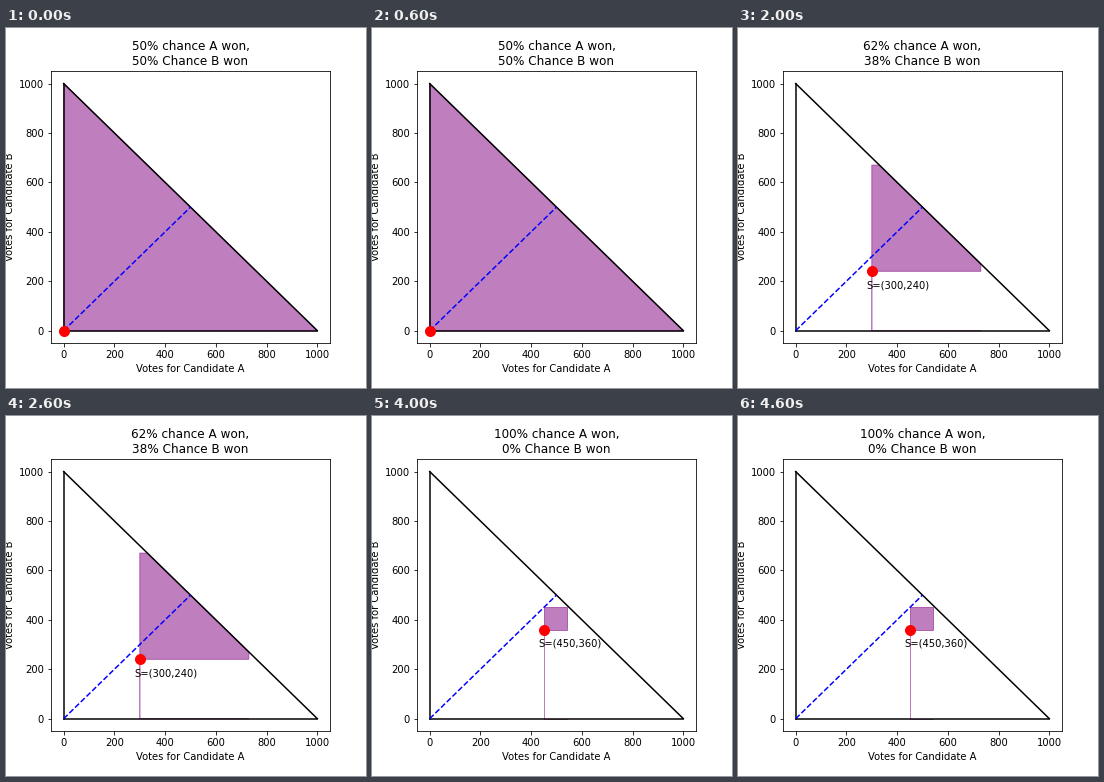
Recreate the animation shown at these times as a matplotlib script. Size 360 by 360 pixels, loop 5000 ms.

```python
import matplotlib.pyplot as plt
from matplotlib.animation import FuncAnimation
from matplotlib.patches import Polygon

TOTAL = 1000
# votes for A, votes for B, reach of the outcome region, chance that A won (%)
STEPS = [
    (0, 0, 1000, 50),
    (150, 120, 730, 54),
    (300, 240, 430, 62),
    (400, 300, 250, 79),
    (450, 360, 90, 100),
]

fig = plt.figure(figsize=(5, 5), dpi=72, facecolor="white")
ax = fig.add_axes([0.125, 0.125, 0.775, 0.755])
ax.set_xlim(-50, 1050)
ax.set_ylim(-50, 1050)
ax.set_xlabel("Votes for Candidate A")
ax.set_ylabel("Votes for Candidate B")

for xs, ys in [((0, 0), (0, TOTAL)), ((0, TOTAL), (0, 0)), ((0, TOTAL), (TOTAL, 0))]:
    ax.plot(xs, ys, color="black", lw=1.5)
ax.plot([0, TOTAL / 2], [0, TOTAL / 2], "b--", lw=1.5)

region = ax.add_patch(Polygon([(0, 0), (0, 1), (1, 0)], color="purple",
                              alpha=0.5, lw=1, zorder=1))
dot, = ax.plot([], [], "ro", ms=10, zorder=3)
label = ax.text(0, 0, "", fontsize=10)
title = ax.set_title("", fontsize=12)


def outline(a, b, reach):
    """Possible results, with a thin tail down to and along the x axis."""
    right, top = a + reach, b + reach
    if right + top > TOTAL:
        corner = [(TOTAL - top, top), (right, TOTAL - right)]
    else:
        corner = [(right, top)]
    return [(a, 0), (a, top), *corner, (right, b), (a, b), (a, 0), (right, 0)]


def draw(i):
    a, b, reach, chance = STEPS[i]
    region.set_xy(outline(a, b, reach))
    dot.set_data([a], [b])
    label.set_position((a - 20, b - 70))
    label.set_text(f"S=({a},{b})" if a else "")
    title.set_text(f"{chance}% chance A won,\n{100 - chance}% Chance B won")
    return region, dot, label, title


anim = FuncAnimation(fig, draw, frames=len(STEPS), interval=1000,
                     repeat=True, repeat_delay=0)
plt.show()
```
